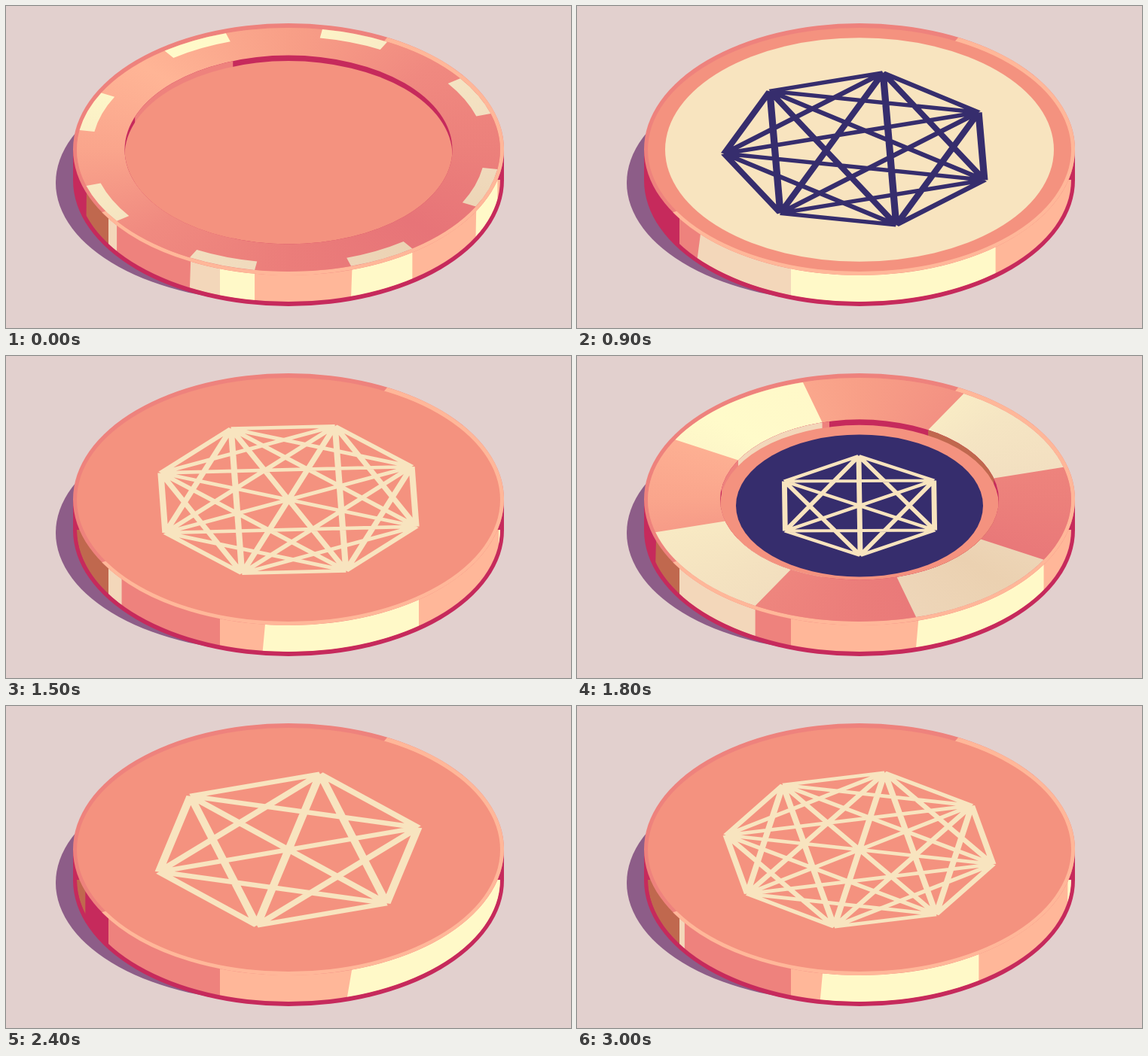
Write an HTML page with a canvas that moves like this. It is 750x428 px and loops after 3.3 s.

```html
<!DOCTYPE html>
<html lang="en">
<head>
<meta charset="utf-8">
<title>Chip designs</title>
<style>
  html, body { margin: 0; width: 100%; height: 100%; overflow: hidden; background: #e2d0ce; }
  canvas { display: block; }
</style>
</head>
<body>
<canvas id="stage" width="750" height="428"></canvas>
<script>
const ctx = document.getElementById('stage').getContext('2d');
const CX = 375, CY = 191, FACE = 281, TILT = 0.5765, THICK = 40, DEPTH = 7.5;
const STEP = 300;
const CRIMSON = '#c62a5c', PINK = '#ee827d', PEACH = '#ffb799', SALMON = '#f4927f',
      CREAM = '#f8e4bf', NAVY = '#362d6d', BROWN = '#c0684e', SAND = '#f3d7ba', LEMON = '#fff9c8';
const rad = deg => deg * Math.PI / 180;

// Stops run clockwise from the right in equal steps.
const RING = ['#ec807b', '#e77478', '#eb7d7a', '#f08a80', '#faa58c', '#ffb596', '#f89f87', '#f08980'];
const INLAY = ['#f1dcbf', '#ebd1b1', '#efd8bc', '#f4e2c0', '#faedc5', '#fffbca', '#fff7c8', '#f5e5c3'];

// marks: count, first angle, width in degrees; inner: inlay's inner radius;
// band: top and bottom of the edge marks, measured up from the lower edge.
const designs = [
  { marks: [8, 9.2, 18.6], inner: 261, hole: 217.5 },
  { marks: [3, 47, 30], inner: 257, hole: 208 },
  { marks: [1, 106.5, 90.5], inner: 255, hole: 199.5 },
  { marks: [2, 50, 90], disc: [258, CREAM], web: [7, 180, -80, NAVY] },
  { marks: [8, 27.3, 18.3], inner: 251, hole: 230, disc: [209, CREAM], web: [9, 145, 266.5, SALMON] },
  { marks: [4, 52, 45], web: [8, 180.5, -70, CREAM] },
  { marks: [4, 29.5, 45], inner: 185, hole: 185, disc: [164, NAVY], web: [6, 114.5, -90.5, CREAM] },
  { marks: [4, 70, 45], web: [7, 180.5, -90, CREAM] },
  { marks: [2, 163.7, 90.2], web: [6, 179.5, -76.5, CREAM] },
  { marks: [1, 88.4, 90], band: [17, 8], disc: [258, CREAM], web: [9, 181, 88.4, NAVY] },
  { marks: [4, 55.7, 45], web: [8, 180.5, -79.3, CREAM] }
];

function oval(x, y, rx, ry, color) {
  ctx.beginPath();
  ctx.ellipse(x, y, rx, ry, 0, 0, 2 * Math.PI);
  if (color) {
    ctx.fillStyle = color;
    ctx.fill();
  }
}

const disc = (y, r, color) => oval(CX, y, r, r * TILT, color);

function strip(from, to, color) {
  ctx.fillStyle = color;
  ctx.fillRect(from, 0, to - from, 428);
}

function clipped(draw) {
  ctx.save();
  draw();
  ctx.restore();
}

// Runs draw in the plane of the chip, centred on it.
function onPlane(y, draw) {
  clipped(() => {
    ctx.translate(CX, y);
    ctx.scale(1, TILT);
    draw();
  });
}

function sweep(colors) {
  const gradient = ctx.createConicGradient(0, 0, 0);
  for (let i = 0; i <= colors.length; i++) {
    gradient.addColorStop(i / colors.length, colors[i % colors.length]);
  }
  return gradient;
}

function eachMark([count, start, width], draw) {
  for (let i = 0; i < count; i++) {
    const a = start + i * 360 / count;
    draw(rad(a), rad(a + width));
  }
}

function drawBase() {
  ctx.fillStyle = '#e2d0ce';
  ctx.fillRect(0, 0, 750, 428);
  oval(352, 235, 286, 158, '#8d5d88');
  oval(CX, 231.5, 286, 167.5, CRIMSON);
  ctx.fillRect(89, 190.5, 572, 41);
}

function drawEdge({ marks, band = [THICK + 20, 0] }) {
  const low = CY + THICK, right = 284;
  const arcY = lift => {
    ctx.beginPath();
    ctx.ellipse(CX, low - lift, FACE, FACE * TILT, 0, 0, Math.PI);
  };
  clipped(() => {
    arcY(0);
    ctx.clip();
    strip(136, right, PINK);
    strip(right, 700, PEACH);

    // A mark is the part of the edge between two lifted copies of the lower curve.
    ctx.beginPath();
    eachMark(marks, (a, b) => {
      const n = 40;
      for (let i = 0; i <= 2 * n; i++) {
        const up = i > n;
        const t = a + (b - a) * (up ? 2 * n - i : i) / n;
        const x = CX + FACE * Math.cos(t);
        const y = low + FACE * TILT * Math.max(-0.02, Math.sin(t)) - band[up ? 0 : 1];
        if (i) ctx.lineTo(x, y); else ctx.moveTo(x, y);
      }
      ctx.closePath();
    });
    ctx.clip();
    strip(0, 136, BROWN);
    strip(136, right, SAND);
    strip(right, 700, LEMON);
  });
}

function drawRim() {
  oval(CX, 190.5, 286, 167.5, PINK);
  ctx.beginPath();
  ctx.moveTo(CX, 190.5);
  ctx.ellipse(CX, 190.5, 286, 167.5, 0, rad(-62.7), rad(150));
  ctx.fillStyle = PEACH;
  ctx.fill();
  disc(CY, FACE, SALMON);
}

function drawRing({ marks, inner, hole }) {
  onPlane(CY, () => {
    ctx.beginPath();
    ctx.arc(0, 0, FACE, 0, 2 * Math.PI);
    ctx.fillStyle = sweep(RING);
    ctx.fill();
    ctx.fillStyle = sweep(INLAY);
    eachMark(marks, (a, b) => {
      ctx.beginPath();
      ctx.arc(0, 0, FACE, a, b);
      ctx.arc(0, 0, inner, b, a, true);
      ctx.fill();
    });
  });
}

function drawHole({ marks, inner, hole }) {
  const d = hole - 185;
  const litFrom = CX - 183 - 0.64 * d;
  const litTo = CX - 40 - 0.85 * d - 0.0058 * d * d;
  clipped(() => {
    disc(CY, hole);
    ctx.clip();
    strip(0, 750, CRIMSON);
    strip(litFrom, litTo, PINK);
    if (inner === hole) {
      eachMark(marks, (a, b) => {
        if (Math.sin((a + b) / 2) > 0) return;
        const from = CX + hole * Math.cos(a), to = CX + hole * Math.cos(b);
        strip(from, to, from < litTo ? SAND : BROWN);
      });
    }
    disc(CY + DEPTH, hole, SALMON);
  });
}

// Every corner of a regular polygon joined to every other.
function drawWeb(y, [corners, radius, turn, color]) {
  onPlane(y, () => {
    const corner = i => {
      const a = rad(turn + i * 360 / corners);
      return [radius * Math.cos(a), radius * Math.sin(a)];
    };
    ctx.beginPath();
    for (let i = 0; i < corners; i++) {
      for (let j = 0; j < i; j++) {
        ctx.moveTo(...corner(i));
        ctx.lineTo(...corner(j));
      }
    }
    ctx.lineWidth = 0.36 * radius / corners;
    ctx.strokeStyle = color;
    ctx.stroke();
  });
}

function drawChip(design) {
  const floor = design.hole ? CY + DEPTH + 0.5 : CY;
  drawBase();
  drawEdge(design);
  drawRim();
  if (design.hole) {
    drawRing(design);
    drawHole(design);
  }
  if (design.disc) disc(floor, ...design.disc);
  if (design.web) drawWeb(floor, design.web);
}

const begin = performance.now();

function tick() {
  const elapsed = performance.now() - begin;
  drawChip(designs[Math.floor(elapsed / STEP) % designs.length]);
  requestAnimationFrame(tick);
}
tick();
</script>
</body>
</html>
```
